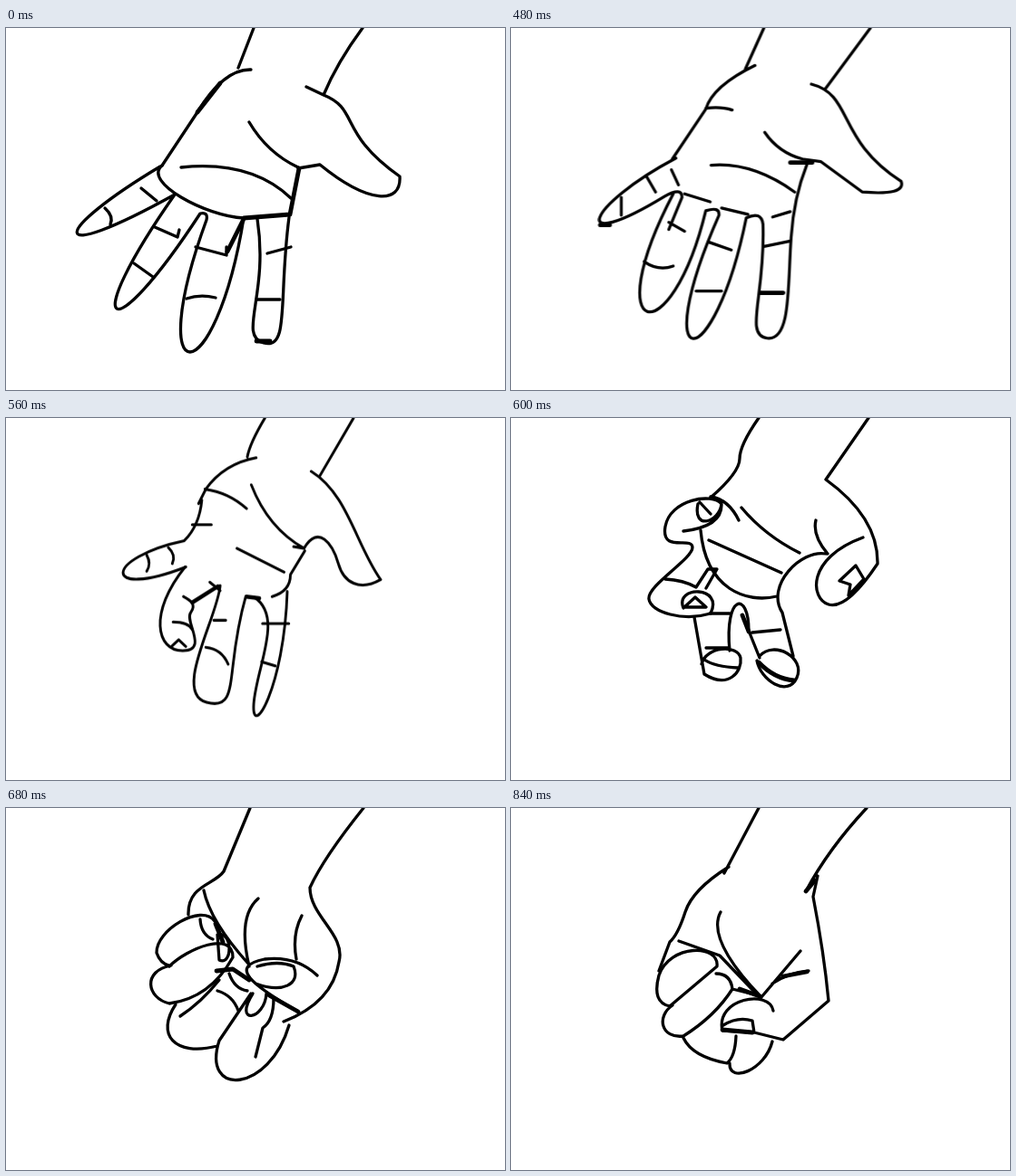
An HTML page without scripts that plays this animation: 550x400 px, repeating every 1280 ms.

```html
<!DOCTYPE html>
<html lang="en">
<head>
<meta charset="utf-8">
<title>Closing hand</title>
<style>
html, body { margin: 0; width: 100%; height: 100%; overflow: hidden; background: #fff; }
svg { display: block; width: 100vw; height: 100vh; }
path { fill: none; stroke: #000; stroke-width: 3.3; stroke-linecap: round; stroke-linejoin: round; }
.bold { stroke-width: 4.8; }
/* Cels are stacked 500 units apart; the strip jumps one cel at a time. */
.strip { animation: flip 1.28s infinite; }
@keyframes flip {
  0% { transform: translateY(0); animation-timing-function: step-end; }
  34.375% { transform: translateY(-500px); animation-timing-function: steps(10, end); }
  65.625%, 100% { transform: translateY(-5500px); }
}
</style>
</head>
<body>
<svg viewBox="0 0 550 400">
<defs>
  <g id="open">
    <path d="M273 0L256 44M270 46Q240 45 211 93L172 152M393 0Q365 38 350 74M331 65L350 74C390 90 365 115 434 164C436 195 400 195 346 151L322 155M268 104Q288 138 322 154M193 154Q270 146 314 188"/>
    <path d="M172 152C150 170 220 208 262 210M170 153C50 225 40 265 186 184C79 337 113 360 214 205Q223 203 221 212C150 407 230 407 262 210M277 211C290 295 255 340 284 348S300 300 312 209"/>
    <path d="M149 177l17 14M109 199q10 9 6 18M164 220l25 11l2-8M141 260l21 15M209 242l34 9v-9M199 299q15-5 32-1M288 249l26-7M276 300h26"/>
    <path class="bold" d="M262 210L313 206L323 155M262 211l-18 36M276 346h15M211 93l25-32"/>
  </g>

  <g id="relaxed">
    <path d="M278 0L257 46M268 42Q220 65 212 91L174 147M212 90Q230 88 242 92M399 0L348 68M332 63C380 75 360 125 434 172Q440 188 390 184L343 150L322 147Q295 140 279 117M218 154Q265 150 313 184"/>
    <path d="M178 146C75 200 55 255 165 189Q185 178 185 190L170 226M175 186C88 350 172 368 212 205Q228 200 227 210C145 394 221 394 258 213Q275 205 277 220C280 300 255 345 282 348S305 290 309 235Q312 190 327 153"/>
    <path d="M145 167l10 17M116 190v20M173 159l8 17M170 218l18 10M142 262q16 11 33 5M188 186l29 9M230 202l30 7M215 240l26 9M201 295h29M288 212l20-6M278 245l30-6"/>
    <path class="bold" d="M274 297h26M308 151h25M92 221h11"/>
  </g>

  <g id="bent">
    <path d="M281 0Q262 30 259 46M270 47Q230 54 207 84L198 101M206 84Q236 88 258 107M202 97Q199 127 180 145C80 165 75 215 182 176M392 0L350 68M339 63C385 90 395 150 426 191C400 205 380 195 373 172S348 125 330 154L317 152M264 79Q285 130 330 154M246 154L305 182"/>
    <path d="M181 176C135 230 145 275 178 275S180 240 188 230S187 215 179 211M225 198C222 235 165 325 208 336S230 300 257 211M268 212C305 235 270 295 267 338S305 320 309 205M290 211Q313 205 313 185L331 157"/>
    <path d="M166 241Q185 241 190 250M164 270l9-8l9 8M212 194l13 10M190 126h24M160 153q10 9 5 19M133 162q6 10 0 19M207 271q20 2 28 20M217 239h15M278 243h33M277 288l17 5"/>
    <path class="bold" d="M190 218L222 199M258 211l16 2"/>
  </g>

  <g id="curl">
    <path d="M273 0Q252 30 252 45T220 88M394 0L347 68Q405 110 404 161Q370 212 350 206C330 200 325 155 388 132M336 113Q332 130 349 150M362 180l18-17l9 15l-17 18l2-12zM254 99Q280 130 318 149M218 135L298 171M209 124C215 190 260 205 293 197M347 150C320 145 280 185 299 215L311 263"/>
    <path d="M232 95C222 82 175 90 170 120S200 130 200 143S150 185 152 200S190 225 220 216M206 95C200 125 230 115 232 95Q233 120 190 125M208 93l12 13M220 87Q240 90 251 113M220 216C235 185 180 185 190 210l13-12l12 11h-25M170 178Q190 179 204 187l13-20h10l-12 21"/>
    <path d="M219 216h22M202 220L213 283C240 300 255 280 253 265C250 250 215 252 210 272M213 267q12 8 37 9M215 254h25M241 257C235 195 262 190 262 235L274 265M266 237l31-3M274 263C290 245 325 265 315 287S275 290 271 268"/>
    <path class="bold" d="M255 218l7 18M273 270q17 18 39 20"/>
  </g>

  <g id="pinch">
    <path d="M269 0L240 70C230 85 200 85 201 118M218 91Q225 125 267 172M278 100Q255 120 268 175M394 0Q350 55 335 88C335 120 375 140 367 170Q360 215 306 236M326 119Q315 140 320 167M343 185Q320 163 285 167C245 175 270 195 322 225M277 175Q300 168 317 175C325 195 305 205 275 194"/>
    <path d="M230 125C215 105 165 135 166 160Q170 172 180 174M214 123Q215 140 228 145M180 175C200 155 250 135 250 165Q225 210 180 216C155 210 150 180 182 174M233 140C250 135 250 175 235 168z"/>
    <path d="M187 217C165 250 185 275 233 263M192 230q23-15 43-40M233 202Q250 207 256 224M246 183Q252 200 266 202M270 205L235 257C215 320 290 315 312 240M272 205C250 240 285 235 287 205M295 210q0 25-12 33l-8 32"/>
    <path class="bold" d="M232 180l18-2l18 12M231 128l8 20M290 207l32 18"/>
  </g>

  <g id="fist">
    <path d="M277 0L236 68Q190 95 183 147L203 151M392 0L329 94C325 125 360 155 355 188Q325 250 295 249Q270 248 248 238C225 205 265 190 307 217M240 221Q260 210 284 215Q275 250 240 221M211 121l18 31M230 114Q235 170 272 202M291 203L323 171M300 190l15-18M290 201h37"/>
    <path d="M183 150l-8 4v12M160 175Q180 160 222 146Q233 155 231 172Q205 190 175 213Q150 200 160 175M231 177Q250 178 254 198M186 208Q205 185 232 178M186 208C160 220 165 255 199 251M254 200C225 195 195 235 195 270C200 300 240 290 240 262L252 238M238 260C230 315 280 305 294 249"/>
    <path class="bold" d="M234 168l20 18M354 190q-9 22-26 40M240 262l-1 22"/>
  </g>

  <g id="tight">
    <path d="M273 0L235 72M240 65Q200 90 192 115T175 148L163 180M392 0Q350 45 325 92M338 75L333 98Q345 160 350 213L300 256L268 248L233 246C225 210 285 200 289 224M234 240Q250 230 266 235l2 13M231 115Q215 145 275 208M276 209l43-51M288 194Q305 182 328 180M185 147L230 163L272 207"/>
    <path d="M163 185C175 150 230 150 227 175L175 219Q155 215 163 185M226 183Q242 183 244 200Q225 230 190 252C165 255 160 230 178 218M244 200l28 7M190 254Q200 275 238 282Q247 275 248 252M241 282C240 305 280 290 288 258"/>
    <path class="bold" d="M252 200l22 8M300 186l26-5M233 245l33 3M335 80l-10 12"/>
  </g>
</defs>

<!-- In-between cels reuse the nearest pose, slightly squeezed. -->
<g class="strip">
  <use href="#open"/>
  <use href="#relaxed" y="500"/>
  <use href="#relaxed" transform="translate(9 1000) scale(.97 .985)"/>
  <use href="#bent" y="1500"/>
  <use href="#bent" transform="translate(38 2000) scale(.88 .935)"/>
  <use href="#curl" y="2500"/>
  <use href="#pinch" transform="translate(-18 3000) scale(1.06 1)"/>
  <use href="#pinch" y="3500"/>
  <use href="#fist" transform="translate(-10 4000) scale(1.04 1.01)"/>
  <use href="#fist" y="4500"/>
  <use href="#tight" transform="translate(-5 5000) scale(1.02 1)"/>
  <use href="#tight" y="5500"/>
</g>
</svg>
</body>
</html>
```
